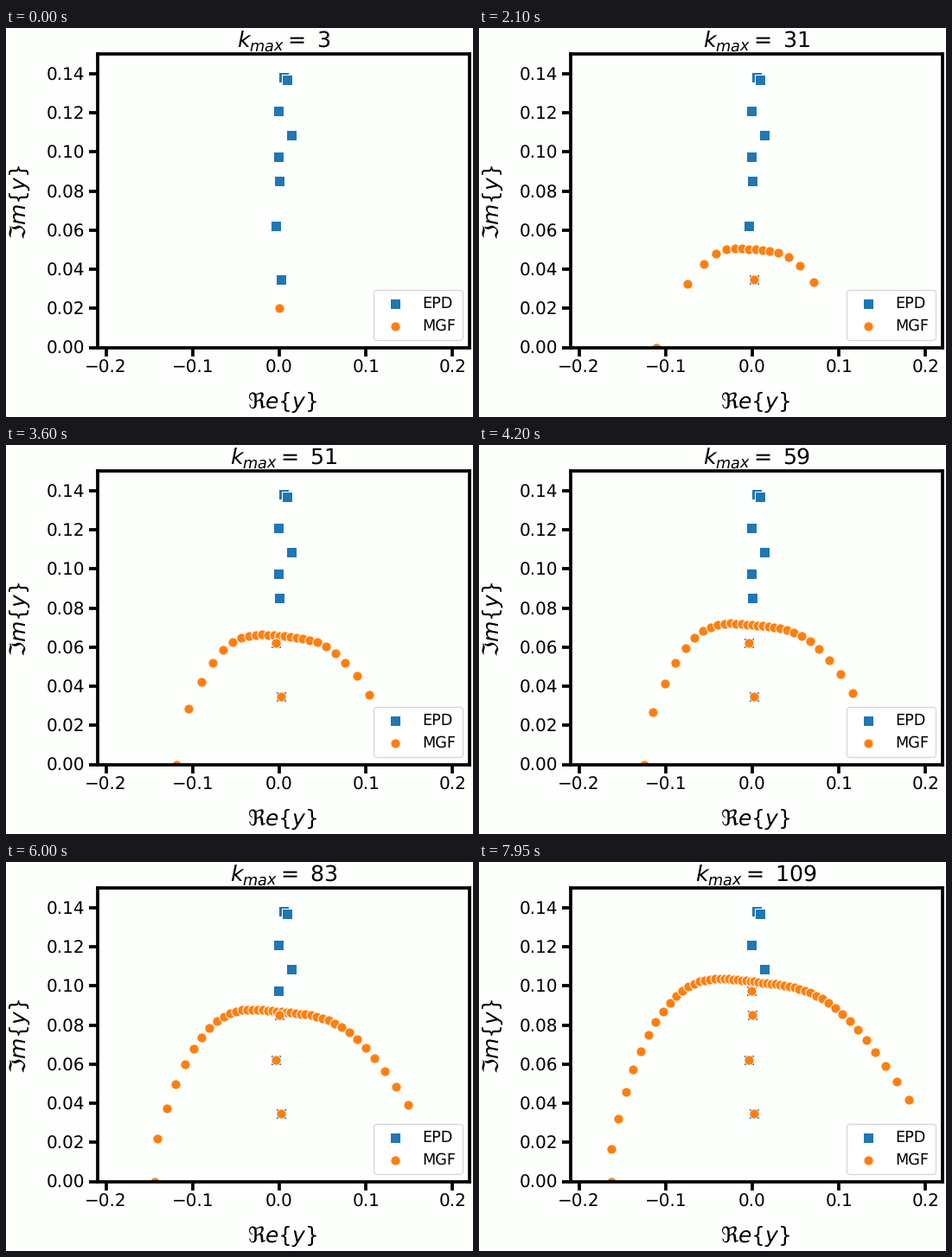
A matplotlib script that plays this animation: 540x450 px, repeating every 8000 ms.

```python
import numpy as np
import matplotlib.pyplot as plt
from matplotlib.animation import FuncAnimation

W, H, DPI = 540, 450, 90
STEP_MS, TICK_MS, LOOP_MS = 150, 50, 8000
LEFT, RIGHT, TOP, BOTTOM = 105.6, 536.4, 30.4, 369.5
X_LIM, Y_LIM = (-0.21, 0.22), (0, 0.15)
UNIT = np.array([(RIGHT - LEFT) / 0.43, (BOTTOM - TOP) / 0.15])  # pixels per unit
PAPER, BLUE, ORANGE = "#fdfffc", "#1f77b4", "#ff7f0e"

plt.rcParams.update({"font.family": "DejaVu Sans", "mathtext.fontset": "dejavusans",
                     "text.hinting": "none"})

# Fixed zeros of the energy distribution
EPD = np.array([(.0046, .1381), (.0092, .1368), (-.0006, .1209), (.0140, .1086),
                (-.0008, .0977), (-.0002, .0852), (-.0040, .0621), (.0022, .0347)])


def crown(k):
    """Height of the middle of the arc, in pixels."""
    return 28 + 8.1 * k ** 0.687


def arc(k, count):
    """Arc of free zeros: widens with sqrt(k), steeper and lower on the left."""
    s = (2 * np.arange(count) - (count - 1)) / max(count - 1, 1)
    half_width = np.hypot(20.6 * np.sqrt(k) - 43.5, 14)
    x = half_width * s * (0.68 + 0.32 * s**2) + (k**2 / 1000 - 3) * s**10
    end_height = 78 - 0.11 * k
    y = crown(k) - (crown(k) - end_height) * np.abs(s) ** 4.5
    y += -0.12 * k * s + (0.48 * k - 10.5) * s**5
    return np.column_stack([x, y]) / UNIT


def real_zero(k):
    """The one zero on the real axis: swings in, then drifts out again."""
    x = -(14.1 * np.sqrt(k) + 15.5 + 290 * np.exp(-k / 11))
    return np.array([(x, 0)]) / UNIT


def mgf_zeros(k):
    """Zeros at order k; those the arc has passed stay on their EPD partner."""
    converged = EPD[EPD[:, 1] < crown(k) / UNIT[1]]
    free = (k - 1) // 2 - len(converged)
    return np.vstack([real_zero(k), arc(k, free), converged])


fig = plt.figure(figsize=(W / DPI, H / DPI), dpi=DPI, facecolor=PAPER)
ax = fig.add_axes([LEFT / W, 1 - BOTTOM / H, (RIGHT - LEFT) / W, (BOTTOM - TOP) / H],
                  facecolor=PAPER)
ax.set(xlim=X_LIM, ylim=Y_LIM, xticks=np.arange(-2, 3) / 10, yticks=np.arange(8) / 50)
ax.tick_params(length=8, width=3, labelsize=16)
for spine in ax.spines.values():
    spine.set_linewidth(3)

style = dict(s=81, linewidths=0.8, edgecolors="white")
ax.scatter(*EPD.T, marker="s", facecolors=BLUE, label="EPD", **style)
mgf = ax.scatter(*mgf_zeros(3).T, marker="o", facecolors=ORANGE, label="MGF", **style)
ax.legend(loc="lower right", fontsize=14.1)

title = ax.set_title("", fontsize=20.2)
label = dict(fontsize=20, ha="center", va="baseline", rotation_mode="anchor")
fig.text(319.7 / W, 1 - 441 / H, r"$\Re e\{y\}$", **label)
fig.text(23.5 / W, 1 - 201.5 / H, r"$\Im m\{y\}$", rotation=90, **label)


def update(frame):
    k = 3 + 2 * (frame * TICK_MS // STEP_MS)
    mgf.set_offsets(mgf_zeros(k))
    title.set_text(rf"$k_{{max}}=$ {k}")
    return mgf, title


anim = FuncAnimation(fig, update, frames=LOOP_MS // TICK_MS, interval=TICK_MS,
                     repeat=True, repeat_delay=0, blit=False)
plt.show()
```
